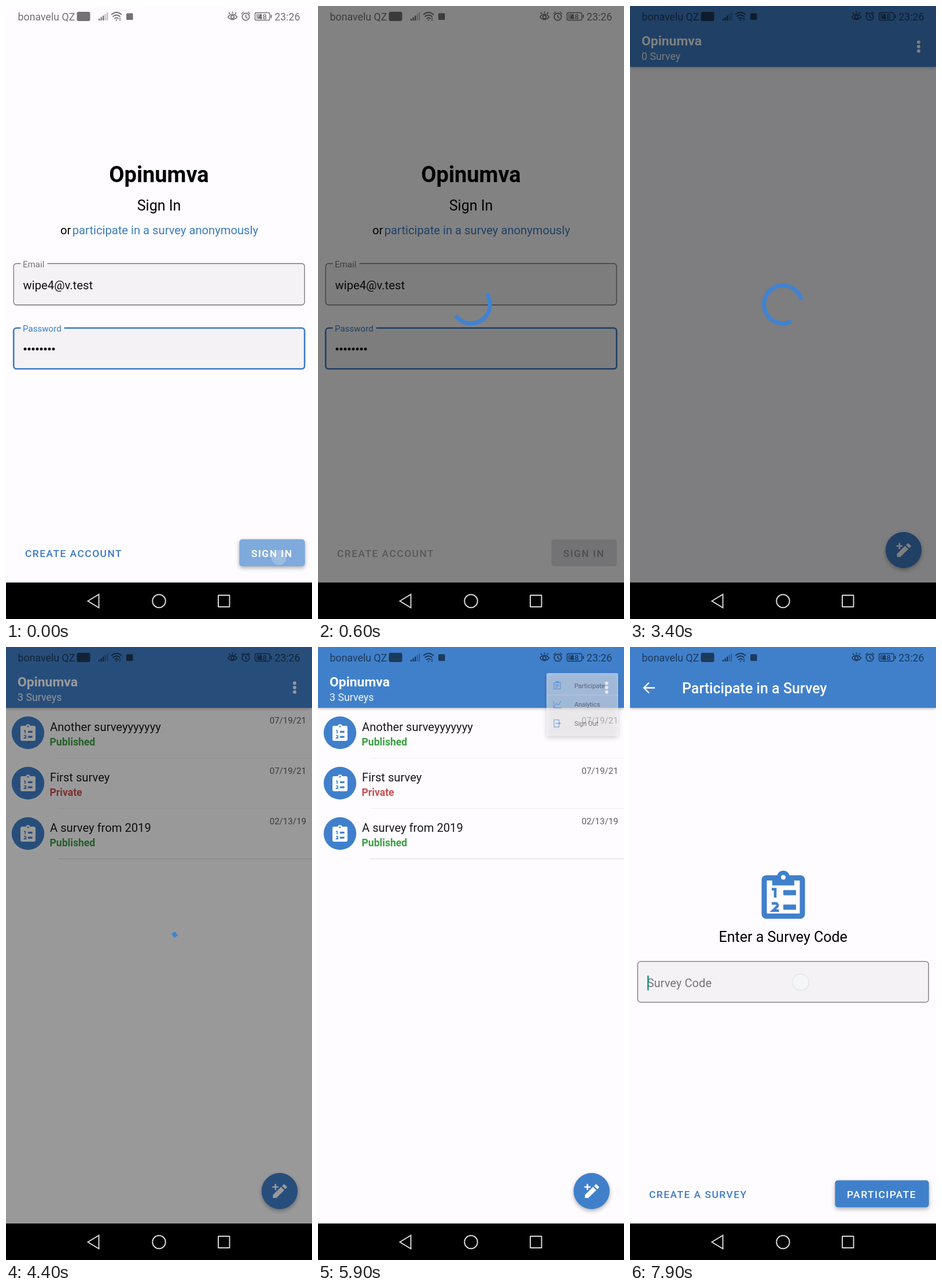
An HTML page with a canvas that plays this animation: 529x1058 px, repeating every 8 s.

```html
<!DOCTYPE html>
<html lang="en">
<head>
<meta charset="utf-8">
<title>Survey app</title>
<style>
html, body { margin: 0; width: 100%; height: 100%; overflow: hidden; background: #000; }
canvas { display: block; }
</style>
</head>
<body>
<canvas id="stage" width="529" height="1058"></canvas>
<script>
const ctx = document.getElementById('stage').getContext('2d');
const LOOP = 8000, BLUE = '#4080cb', PAPER = '#fefcff', FIELD = '#f4f2f5', INK = '#19181a';
const APP = 'Opinumva', CARRIER = 'bonavelu QZ', EMAIL = 'wipe4@v.test';

const ramp = (t, a, b) => Math.min(1, Math.max(0, (t - a) / (b - a)));
const easeOut = p => 1 - (1 - p) ** 3;

function text(str, x, y, size, color, weight = 400, align = 'left', spacing = 0) {
  ctx.font = `${weight} ${size}px Roboto, sans-serif`;
  ctx.letterSpacing = spacing + 'px';
  ctx.textAlign = align;
  ctx.fillStyle = color;
  ctx.fillText(str, x, y);
}
function fill(d, color) {
  ctx.fillStyle = color;
  ctx.fill(new Path2D(d));
}
function stroke(d, color, width) {
  ctx.strokeStyle = color;
  ctx.lineWidth = width;
  ctx.stroke(new Path2D(d));
}
function box(x, y, w, h, r, color, border, width) {
  ctx.beginPath();
  ctx.roundRect(x, y, w, h, r);
  if (color) { ctx.fillStyle = color; ctx.fill(); }
  if (border) { ctx.strokeStyle = border; ctx.lineWidth = width; ctx.stroke(); }
}
function disc(x, y, r, color, border, width) {
  box(x - r, y - r, 2 * r, 2 * r, r, color, border, width);
}
function group(draw, alpha = 1) {
  ctx.save();
  ctx.globalAlpha *= alpha;
  draw();
  ctx.restore();
}
function raised(draw, blur = 7, dy = 3) {
  group(() => {
    ctx.shadowColor = 'rgba(0,0,0,.32)';
    ctx.shadowBlur = blur;
    ctx.shadowOffsetY = dy;
    draw();
  });
}
function zoom(x, y, scale, draw, alpha) {
  group(() => {
    ctx.translate(x, y);
    ctx.scale(scale, scale);
    ctx.translate(-x, -y);
    draw();
  }, alpha);
}

function statusBar() {
  const c = 'rgba(0,0,0,.55)';
  text(CARRIER, 20.5, 24.5, 17.8, c);
  box(122.5, 10, 23, 16, 3, c);
  for (let i = 0; i < 5; i++)
    box(160 + i * 3.5, 22 - i * 2.7, 2.3, 3 + i * 2.7, 0, i < 3 ? c : 'rgba(0,0,0,.25)');
  stroke('M182 15Q191 7 200 15M184.5 18.5Q191 12.5 197.5 18.5M187.5 22Q191 18.5 194.5 22', c, 1.8);
  fill('M189 23.5h4l-2 2.5zM195 22l2-2 2 2zM195 23.5l2 2 2-2z', c);
  box(208, 12.5, 11.5, 11.5, 1.5, c);
  stroke('M383.5 19Q391.5 9.5 399.5 19Q391.5 28 383.5 19M385 11l2 3M391.5 9.5v3M398 11l-2 3', c, 1.7);
  disc(391.5, 19, 2.8, null, c, 1.8);
  disc(414.5, 18.5, 6.2, null, c, 1.7);
  stroke('M414.5 15v4l3 2M407 13.5l4-3.5M422 13.5l-4-3.5', c, 1.6);
  box(430.5, 11.5, 25.5, 13, 2.5, null, c, 1.4);
  box(432.5, 13.5, 9, 9, 1, 'rgba(0,0,0,.3)');
  box(457.5, 15, 2, 6, 1, c);
  text('48', 443.5, 23, 13, c, 500, 'center');
  text('23:26', 508.5, 24.5, 17.8, c, 400, 'right');
}

function navBar() {
  const c = '#d6d6d6';
  box(0, 995, 529, 63, 0, '#000');
  stroke('M141.5 1027L160.5 1015.5V1038.5Z', c, 2);
  disc(264.5, 1027, 11.3, null, c, 2);
  box(367, 1017, 19.5, 20, 0.5, null, c, 2);
}

function input(y, h, label, notch, color, width) {
  box(13.2, y, 503, h, 5, FIELD, color, width);
  if (!label) return;
  box(25.5, y - 3, notch, 5, 0, PAPER);
  text(label, 29, y + 6, 15.1, color);
}
function button(x, label, disabled) {
  const face = () => box(x, 920.5, 516.7 - x, 46.5, 5, disabled ? 'rgba(0,0,0,.12)' : BLUE);
  disabled ? face() : raised(face);
  text(label, x + 20.5, 950.5, 17.4, disabled ? 'rgba(0,0,0,.32)' : '#fff', 500, 'left', 1.47);
}
function textButton(label, disabled) {
  text(label, 33, 950.5, 17.4, disabled ? 'rgba(0,0,0,.32)' : '#3c7cc4', 500, 'left', 1.47);
}
function header() {
  raised(() => box(0, 0, 529, 105, 0, BLUE), 5, 1);
}

// Numbered clipboard; solid for avatars, outlined when large.
function clipboard(x, y, scale, front, back, outlined) {
  group(() => {
    ctx.translate(x, y);
    ctx.scale(scale, scale);
    box(-37.5, -37.5, 75, 75, 8, front);
    disc(0, -34.5, 11, front);
    const mark = outlined ? front : back;
    if (outlined) {
      box(-28.5, -28.5, 57, 57, 1, back);
      box(-19, -29, 38, 9, 0, front);
    }
    disc(0, -34, 4, back);
    stroke('M-20 -13.5H-14V1', mark, 4.6);
    stroke('M-20 11H-12Q-8 14 -11 17L-18 23.5H-7.5', mark, 4.4);
    box(0, -12, 22, 9, 1, mark);
    box(0, 13, 22, 9, 1, mark);
  });
}

function signIn(t) {
  const busy = t >= 461;
  box(0, 0, 529, 995, 0, PAPER);
  text(APP, 264.5, 304, 38, '#000', 700, 'center');
  text('Sign In', 264.5, 353, 25, '#000', 400, 'center');
  const link = 'participate in a survey anonymously';
  text('or ', 94, 393.5, 20.2, '#000');
  text(link, 436, 393.5, 20.2, '#3c7cc4', 400, 'right');
  input(444.5, 71.5, 'Email', 46, '#757377', 1.3);
  text(EMAIL, 29.5, 489, 20.3, '#111');
  input(555.7, 70.6, 'Password', 75, '#3c7cc4', 2.6);
  for (let i = 0; i < 8; i++) disc(33 + i * 7, 592, 2.5, '#111');
  textButton('CREATE ACCOUNT', busy);
  button(403.5, 'SIGN IN', busy);
  const press = 1 - ramp(t, 80, 360);
  if (press) group(() => {
    box(403.5, 920.5, 113.2, 46.5, 5, 'rgba(255,255,255,.33)');
    text('SIGN IN', 424, 950.5, 17.4, '#fff', 500, 'left', 1.47);
    disc(472, 952, 13, 'rgba(255,255,255,.22)');
  }, press);
}

const SURVEYS = [
  ['Another surveyyyyyyy', true, '07/19/21'],
  ['First survey', false, '07/19/21'],
  ['A survey from 2019', true, '02/13/19']
];
function home(t) {
  const loaded = t >= 4300;
  box(0, 0, 529, 995, 0, PAPER);
  header();
  text(APP, 20, 67.5, 22.9, '#fff', 700);
  text(loaded ? '3 Surveys' : '0 Survey', 20, 93, 17.8, '#f2f6fb');
  for (const y of [62.3, 70, 77.7]) disc(499, y, 2.9, '#fff');
  if (loaded) SURVEYS.forEach(([name, published, date], i) => {
    const y = 148 + 87 * i;
    disc(38, y, 28.2, BLUE);
    clipboard(38, y + 1, 0.347, '#fff', BLUE, false);
    text(name, 76, y - 3.5, 20.2, INK);
    text(published ? 'Published' : 'Private', 75.5, y + 21.5, 17.6, published ? '#3a9f40' : '#c9504f', 700);
    text(date, 519, y - 16.5, 15.1, '#5f5d61', 400, 'right');
    box(90, y + 43, 439, 1.3, 0, i < 2 ? '#f0eef1' : '#e2e0e3');
  });
  raised(() => disc(473, 939, 31.2, BLUE));
  fill('M461.5 951v-5.5l14-13.7 5.6 5.6-14 13.6zM477.2 930.2l2.6-2.5q1-1 2 0l3.6 3.6q1 1 0 2l-2.6 2.5z', '#fff');
  stroke('M460.5 932h10.5M465.8 926.7v10.6', '#fff', 2.6);
}

function menu(t) {
  const pressed = t >= 6860;
  raised(() => box(289, 45, 230, 201, 5, PAPER), 9, 3);
  box(289, 175, 230, 1, 0, '#f0eef1');
  if (pressed) {
    box(289, 55, 230, 60, 0, '#cac8cb');
  } else {
    box(289, 115, 230, 1, 0, '#f0eef1');
  }
  ['Participate', 'Analytics', 'Sign Out'].forEach((label, i) => text(label, 378.5, 93.3 + 60 * i, 20.2, INK));
  box(313.5, 75, 20.5, 21, 2, null, BLUE, 2.6);
  fill('M319 73q4.7-5 9.4 0v4h-9.4z', BLUE);
  stroke('M317.5 82h12.5M317.5 86.3h12.5M317.5 90.6h8.5', BLUE, 2.4);
  stroke('M312.3 134v22.7H337M313 154l7-11.5 8 4.5 7-12', BLUE, 2.6);
  stroke('M329 201v-6.5h-15.5v23H329V211', BLUE, 2.6);
  stroke('M318.5 206h12', BLUE, 3);
  fill('M328.5 200l7 6-7 6z', BLUE);
}

function participate(t) {
  box(0, 0, 529, 995, 0, PAPER);
  header();
  stroke('M43 70.5H24.5M33 61.5L24 70.5L33 79.5', '#fff', 2.4);
  text('Participate in a Survey', 90, 79.5, 25, '#fff', 500);
  clipboard(265, 431.5, 1, BLUE, PAPER, true);
  text('Enter a Survey Code', 264.7, 509, 25, '#000', 400, 'center');
  input(542.7, 70.4, '', 0, '#757377', 1.3);
  text('Survey Code', 29.5, 587, 20.2, '#77757a');
  if (t >= 7860) box(30, 567, 2.4, 25.5, 0, '#12907f');
  textButton('CREATE A SURVEY');
  button(354.5, 'PARTICIPATE');
  if (t >= 7760) disc(295, 578.5, 14, 'rgba(246,249,250,.5)', '#e4e7ea', 1.6);
}

// Material arc: the head runs in the first half of a cycle, the tail in the second.
function bezierEase(u, a, b, c, d) {
  if (u <= a) return 0;
  if (u >= d) return 1;
  let lo = 0, hi = 1, s;
  for (let i = 0; i < 20; i++) {
    s = (lo + hi) / 2;
    const r = 1 - s;
    const x = a * r ** 3 + 3 * b * s * r * r + 3 * c * s * s * r + d * s ** 3;
    x < u ? lo = s : hi = s;
  }
  return s * s * (3 - 2 * s);
}
function spinner(age) {
  const u = age / 1333 % 1, base = age / 2222 + u * 0.25 - 0.25;
  const tail = base + 0.75 * bezierEase(u, 0.5, 0.7, 0.6, 1);
  const head = base + 0.75 * bezierEase(u, 0, 0.2, 0.1, 0.5);
  ctx.beginPath();
  ctx.arc(264.5, 515, 32.8, tail * 2 * Math.PI, (head + 0.002) * 2 * Math.PI);
  ctx.lineCap = 'square';
  ctx.lineWidth = 7.2;
  ctx.strokeStyle = '#4083d0';
  ctx.stroke();
}
function loading(t, start, fadeIn, fadeOut, end) {
  const shown = ramp(t, start, fadeIn) * (1 - ramp(t, fadeOut, end));
  if (!shown) return;
  box(0, 0, 529, 995, 0, `rgba(0,0,0,${shown / 2})`);
  group(() => spinner((t - start) * 1.904), Math.min(1, shown * 1.25));
}

function draw(t) {
  const toHome = ramp(t, 2900, 3030), toCode = easeOut(ramp(t, 7080, 7320));
  if (toHome < 1) signIn(t);
  if (toHome > 0 && toCode < 1) {
    zoom(264.5, 500, 0.9 + 0.1 * easeOut(toHome), () => home(t), toHome);
    if (t >= 5660 && t < 5900) disc(504.5, 61.5, 14, 'rgba(255,255,255,.25)');
    const open = easeOut(ramp(t, 5860, 6040));
    const shown = open * (1 - ramp(t, 7020, 7140));
    if (shown) zoom(519, 45, open, () => menu(t), shown);
    if (t >= 6860 && t < 7000) disc(452, 93, 13.5, 'rgba(255,255,255,.25)', 'rgba(255,255,255,.12)', 1);
  }
  if (toCode > 0) zoom(264.5, 500, 0.87 + 0.13 * toCode, () => participate(t), toCode);
  statusBar();
  loading(t, 461, 605, 2800, 2920);
  loading(t, 3037, 3180, 4370, 4520);
  navBar();
}

function tick(now) {
  group(() => draw(now % LOOP));
  requestAnimationFrame(tick);
}
requestAnimationFrame(tick);
</script>
</body>
</html>
```
